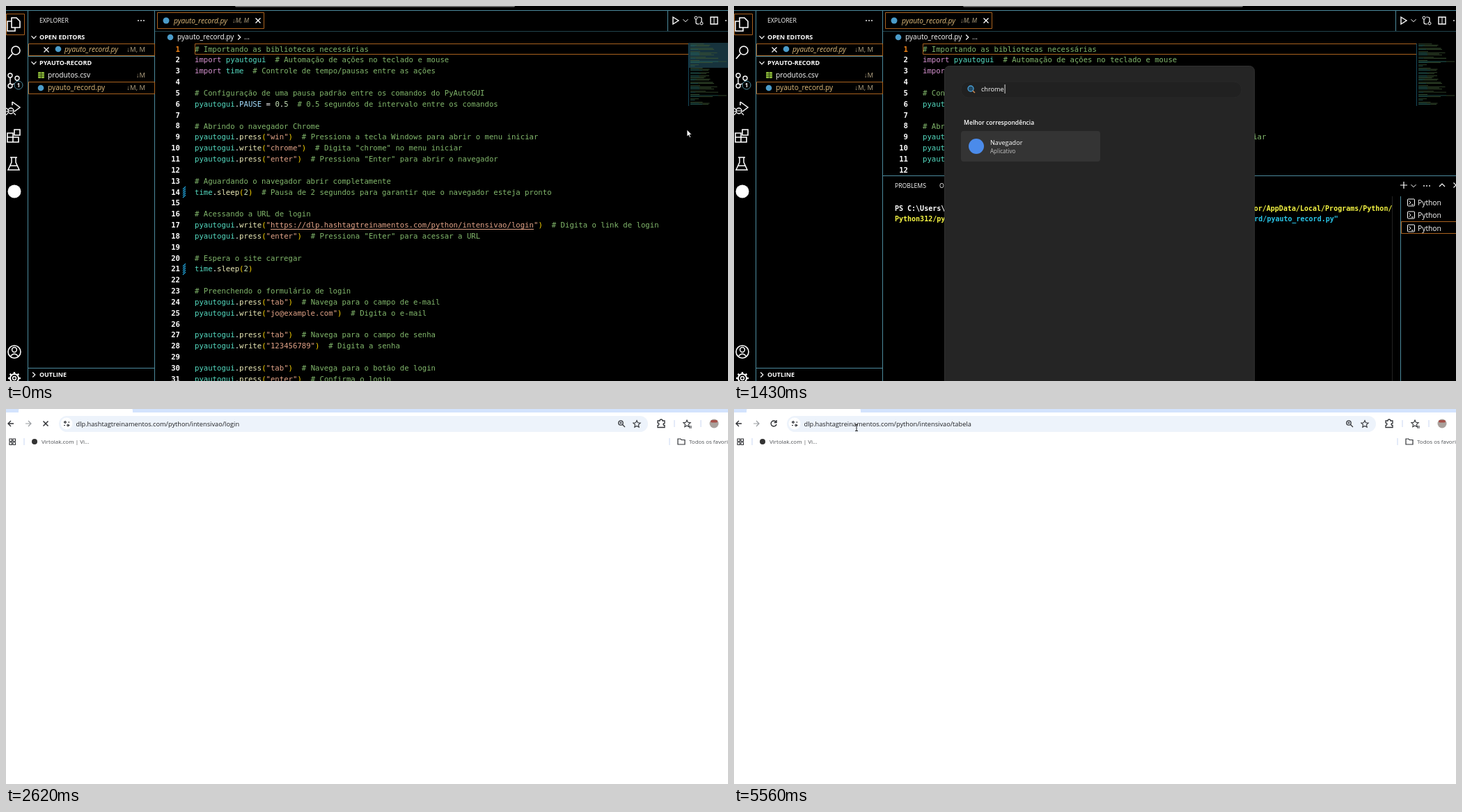
Write an HTML page with a canvas that moves like this. It is 1037 px wide and 540 px high and loops after 5.62 s.

```html
<!DOCTYPE html>
<html lang="pt">
<head>
<meta charset="utf-8">
<title>Automação de cadastro</title>
<style>
html, body { margin: 0; width: 100%; height: 100%; overflow: hidden; background: #000 }
canvas { display: block }
</style>
</head>
<body>
<canvas id="stage" width="1037" height="540"></canvas>
<script>
const LOOP = 5620, W = 1037, H = 540;
const c = document.getElementById('stage').getContext('2d');
const UI = '"Open Sans", sans-serif', MONO = '"DejaVu Sans Mono", monospace', FORM = 'Inter, sans-serif';
const TEAL = '#4c8a9d', ORANGE = '#a9621f', TAN = '#e2bd7c', DIM_TAN = '#b7a684';

// y is the visual middle of the line
function text(str, x, y, size, color, style = '', font = UI, align = 'left') {
  c.font = `${style} ${size}px ${font}`;
  c.textAlign = align;
  c.fillStyle = color;
  c.fillText(str, x, y + size * .34);
  return c.measureText(str).width;
}
function box(x, y, w, h, fill, radius = 0, stroke, line = 1) {
  c.beginPath();
  c.roundRect(x, y, w, h, radius);
  if (fill) { c.fillStyle = fill; c.fill(); }
  if (stroke) { c.strokeStyle = stroke; c.lineWidth = line; c.stroke(); }
}
const dot = (x, y, r, fill, stroke, line) => box(x - r, y - r, 2 * r, 2 * r, fill, r, stroke, line);
function path(x, y, d, color, line = 1.2, fill) {
  const p = new Path2D(d);
  c.save();
  c.translate(x, y);
  if (fill) { c.fillStyle = fill; c.fill(p); }
  c.strokeStyle = color; c.lineWidth = line; c.stroke(p);
  c.restore();
}
function card(x, y, w, h, radius, fill = '#fff') {
  c.save();
  c.shadowColor = '#0005'; c.shadowBlur = 5; c.shadowOffsetY = 1;
  box(x, y, w, h, fill, radius);
  c.restore();
}
const dots = (x, y, color) => [-4, 0, 4].forEach(d => dot(x + d, y, .9, color));
const CROSS = 'M-3.5-3.5l7 7M3.5-3.5l-7 7', DOWN = 'M-3.5-1.8L0 1.8l3.5-3.6', RIGHT = 'M-1.8-3.5L1.8 0l-3.6 3.5';

// ---------- code editor ----------
const ADDRESS = 'dlp.hashtagtreinamentos.com/python/intensivao/';
const MAIL = 'jo@example.com';
const code = `# Importando as bibliotecas necessárias
import pyautogui  # Automação de ações no teclado e mouse
import time  # Controle de tempo/pausas entre as ações

# Configuração de uma pausa padrão entre os comandos do PyAutoGUI
pyautogui.PAUSE = 0.5  # 0.5 segundos de intervalo entre os comandos

# Abrindo o navegador Chrome
pyautogui.press("win")  # Pressiona a tecla Windows para abrir o menu iniciar
pyautogui.write("chrome")  # Digita "chrome" no menu iniciar
pyautogui.press("enter")  # Pressiona "Enter" para abrir o navegador

# Aguardando o navegador abrir completamente
time.sleep(2)  # Pausa de 2 segundos para garantir que o navegador esteja pronto

# Acessando a URL de login
pyautogui.write("https://${ADDRESS}login")  # Digita o link de login
pyautogui.press("enter")  # Pressiona "Enter" para acessar a URL

# Espera o site carregar
time.sleep(2)

# Preenchendo o formulário de login
pyautogui.press("tab")  # Navega para o campo de e-mail
pyautogui.write("${MAIL}")  # Digita o e-mail

pyautogui.press("tab")  # Navega para o campo de senha
pyautogui.write("123456789")  # Digita a senha

pyautogui.press("tab")  # Navega para o botão de login
pyautogui.press("enter")  # Confirma o login`.split('\n');
const CHAR = 6.41, PITCH = 15.84;

function tokenColor(token, next) {
  if (token[0] == '#') return '#82b86c';
  if (token[0] == '"') return '#e3a488';
  if (token == 'import') return '#d592cf';
  if (token == 'pyautogui' || token == 'time') return '#55dcc2';
  if (token == 'PAUSE') return '#a5e0ff';
  if (/\d/.test(token)) return '#c5dfb6';
  if (/[()]/.test(token)) return '#ffd700';
  return next == '(' ? '#ecebb8' : '#fff';
}
function codeLines() {
  code.forEach((line, i) => {
    const y = 62 + i * PITCH;
    text(i + 1, 250, y, 10.6, i ? '#fff' : '#f38518', 'bold', MONO, 'right');
    for (const m of line.matchAll(/#.*|"[^"]*"|\w+|[^\w"#]/g))
      text(m[0], 271 + m.index * CHAR, y, 10.65, tokenColor(m[0], line[m.index + m[0].length]), '', MONO);
  });
  box(380, 321, 378, 1, '#e3a488');
  for (const y of [268, 379])
    for (let d = -7; d < 7; d += 3) path(254, y + d, 'M0 3l4-4', '#1f9bd0', 1.2);
}
function minimap(hover) {
  if (hover) box(980, 53, 57, 36, '#17333d');
  box(980, 54, 1, 90, '#164a5c');
  for (let i = 0; i < 57; i++) {
    const line = code[i % code.length], y = 54.3 + i * 1.58, start = line.search('#');
    if (start) box(983, y, Math.min(start < 0 ? line.length : start, 100) * .5, .8, '#27625b');
    if (start >= 0) box(983 + start * .5, y, Math.min(54 - start * .5, (line.length - start) * .5), .8, '#3b5433');
  }
}
function activityBar() {
  const w = '#fff';
  box(.5, 11.5, 26, 30, null, 0, ORANGE);
  path(11, 26, 'M-3-9h7l5 5v9h-12zM-3-4h-6v14h11v-5', w, 1.6);
  dot(14, 64, 6, null, w, 1.6); path(9, 69, 'M0 0l-6 7', w, 1.8);
  dot(6, 100, 3, null, w, 1.4); dot(6, 115, 3, null, w, 1.4); dot(16, 104, 3, null, w, 1.4);
  path(6, 103, 'M0 0v9M10 4q0 5-8 6', w, 1.4);
  dot(18, 114, 6, '#000', TEAL); text('1', 18, 114, 8, w, 'bold', UI, 'center');
  path(11, 147, 'M-2-9l11 8-8 6M-2-9v5', w, 1.5);
  dot(7, 151, 4, null, w, 1.4); path(7, 151, 'M-7-4l3 2M-7 1h3M-7 6l3-3M7 6l-3-3M-4 0h8', w, 1.1);
  path(11, 187, 'M-9-4h8v13h-8zM-9 2h16v7h-16M1-9h8v8h-8z', w, 1.6);
  path(11, 227, 'M-5-9h10M-3-9v7l-5 11h16l-5-11v-7M-5 3h10', w, 1.5);
  dot(12, 267, 9.5, w);
  dot(12, 498, 9, null, w, 1.6); dot(12, 495, 3.4, null, w, 1.5); path(12, 505, 'M-6 0q6-8 12 0', w, 1.5);
  dot(12, 536, 6, null, w, 2); dot(12, 536, 2.5, null, w, 1.4);
  for (let a = 0; a < 8; a++) {
    const u = Math.cos(a * .785), v = Math.sin(a * .785);
    path(12, 536, `M${u * 6} ${v * 6}L${u * 9} ${v * 9}`, w, 2.4);
  }
}
function sideBar() {
  text('EXPLORER', 48, 21.5, 8.7, '#fff');
  dots(194, 21, '#fff');
  path(40, 45, DOWN, '#fff'); text('OPEN EDITORS', 48, 45, 9, '#fff', 'bold');
  path(40, 82, DOWN, '#fff'); text('PYAUTO-RECORD', 48, 82, 9, '#fff', 'bold');
  path(40, 531, RIGHT, '#fff'); text('OUTLINE', 48, 531, 8.9, '#fff', 'bold');
  box(32.5, 54.5, 181, 17, null, 0, ORANGE);
  box(32.5, 109.5, 181, 17, null, 0, ORANGE);
  path(58, 63, CROSS, '#fff');
  dot(75, 62, 4.3, '#4b9cc9'); text('pyauto_record.py', 84, 63, 10.2, TAN, 'italic');
  box(46, 95, 9, 9, '#8bb83a', 1); path(46, 95, 'M0 3h9M0 6h9M4.5 0v9', '#24340c', .8);
  text('produtos.csv', 60, 99.5, 10.2, '#fff');
  dot(50, 118, 4.3, '#4b9cc9'); text('pyauto_record.py', 60, 118, 10.2, TAN);
  [[63, '↓M, M'], [100, '↓M'], [118, '↓M, M']].forEach(([y, s]) => text(s, 200, y, 9.5, DIM_TAN, '', UI, 'right'));
}
function terminal(t) {
  box(215, 244, W, H, '#000');
  box(214, 244, W, 1, TEAL);
  text('PROBLEMS', 231, 259, 8.7, '#fff');
  text('OUTPUT', 295, 259, 8.7, '#fff');
  text('DEBUG CONSOLE', 347, 259, 8.7, '#fff');
  text('TERMINAL', 438, 259, 8.7, '#fff');
  box(438, 268, 43, 1, '#f38518');
  path(962, 258, 'M-5 0h10M0-5v10', '#fff'); path(976, 259, DOWN, '#fff', 1);
  dots(995, 259, '#fff'); path(1017, 258, 'M-4 2l4-4 4 4', '#fff'); path(1037, 258, CROSS, '#fff');
  box(945, 274, 1, 266, '#222'); box(957, 274, 1, 266, TEAL);
  [283, 301, 320].forEach(y => {
    box(967.5, y - 5, 10, 10, null, 1, '#fff');
    path(971, y, 'M-1.5-2.5l2.5 2.5-2.5 2.5M2 3h3', '#fff', 1);
    text('Python', 982, y, 10.3, '#fff');
  });
  box(958.5, 310.5, 80, 17, null, 0, ORANGE);
  if (t < 540) return;
  const folder = 'Documents/Programas/Estudos/Automacao/pyauto-record';
  const put = (s, x, y, color) => text(s, x, y, 10, color, 'bold', MONO);
  put(`PS C:\\Users\\autor\\${folder.replaceAll('/', '\\')}> &`, 231, 292, '#fff');
  put('C:/Users/autor/AppData/Local/Programs/Python/', 674.5, 292, '#f5f543');
  put('Python312/python.exe', 231, 306.5, '#f5f543');
  put(`"c:/Users/autor/${folder}/pyauto_record.py"`, 356, 306.5, '#29c5e8');
}
function editor(t) {
  box(0, 0, W, H, '#000');
  box(329, -2, 402, 3.5, '#777', 2);
  codeLines();
  box(271.5, 54.5, 709, 15, null, 0, ORANGE);
  minimap(t < 150);
  box(0, 6, W, 1, TEAL);
  [31, 213].forEach(x => box(x, 6, 1, H, TEAL));
  [72, 521].forEach(y => box(32, y, 181, 1, TEAL));
  box(214, 36, W, 1, '#21434d');
  box(950, 6, 1, 30, TEAL);
  activityBar();
  sideBar();
  box(217.5, 9.5, 153, 23, null, 0, ORANGE);
  dot(230, 21, 4.5, '#4b9cc9'); text('pyauto_record.py', 241, 21.5, 10.2, TAN, 'italic');
  text('↓M, M', 325, 21, 9, DIM_TAN, 'italic'); path(362, 21, CROSS, '#fff', 1.4);
  dot(236, 45, 4.3, '#4b9cc9'); text('pyauto_record.py', 246, 45, 10.1, '#fff');
  path(335, 45, RIGHT, '#fff'); text('...', 342, 45, 10, '#fff');
  path(962, 21, 'M-4-5l8 5-8 5z', '#fff', 1.4); path(976, 21, DOWN, '#fff', 1);
  dot(991, 17, 2, null, '#fff'); dot(999, 25, 2, null, '#fff');
  path(995, 21, 'M-4-2v5q0 2 3 2h2M4 2v-5q0-2-3-2h-2', '#fff');
  box(1012, 16, 10, 10, null, 0, '#fff', 1.4); box(1016.5, 16, 1, 10, '#fff'); dots(1038, 21, '#fff');
  if (t >= 420) terminal(t);
}
function pointer(t) {
  const p = Math.min(1, Math.max(0, (t - 60) / 300)), e = p * p * (3 - 2 * p);
  path(978 - 17 * e, 178 - 158 * e, 'M0 0v10l2.4-2 1.6 3.6 1.6-.8L4 7.3h3z', '#000', .8, '#fff');
}

// ---------- start menu ----------
const apps = [
  ['NR Leitura', '', '#5b3c88'], ['Ruma', '', '#1f9fd8', 1], ['Vantorix 365', '(Pacote)', '#6a64d8', 1],
  ['Postvale (new)', '', '#1a78d0'], ['Vantorix Loja', '', '#e6e6e6'], ['Fotos', '', '#2b86dc'],
  ['Configurações', '', '#8a9299', 1], ['Zolk', '', '#107c10'], ['Textorial', '', '#0f7b68', 1],
  ['Vantorix', 'Cortavídeo', '#8d4be0'], ['Fazer', '', '#3d82e6'], ['Tramarix', '', '#0a66c2'],
  ['Calculadora', '', '#8fa9ba'], ['Relógio', '', '#d9d9d9', 1], ['Bloco de notas', '', '#48b4dc'],
  ['Traço', '', '#2d9bd4', 1], ['Filmes e TV', '', '#1c8ad6'], ['Ferramenta de', 'Captura', '#d9d4d4']];
const recents = [
  ['TelaQuadros', 'Adicionados recentemente', '#c9c9c9'], ['Prisma DX Desktop', 'Adicionados recentemente', '#e8b71d'],
  ['Résumé - Caio Benedito Fontana L...', '4h atrás', 'pdf'], ['Animação', '7h atrás', 'image'],
  ['Dashboard Demonstration', '7h atrás', 'page'], ['Apostila - Conceitos Básicos da Ori...', '23h atrás', 'pdf']];

function menuButton(label, x, y, w) {
  box(x, y - 8, w, 17, '#343434', 3);
  text(label, x + 6, y, 8.1, '#fff');
  path(x + w - 9, y, 'M-1.5-2.5l2.5 2.5-2.5 2.5', '#ccc', 1);
}
function startMenu(t) {
  const e = Math.min(1, Math.max(0, (t - 950) / 170));
  c.save();
  c.translate(0, 456 * (1 - e) ** 3);
  box(302.5, 86.5, 445, 480, '#252525', 7, '#303030');
  box(326, 109, 403, 23, '#212121', 11, '#292929');
  dot(340, 119, 4, '#234a63', '#4aa0d8', 1.3); path(343, 122, 'M0 0l3 3', '#d08a50', 1.5);
  if (t < 1240) {
    box(355, 113, 1, 13, '#ddd');
    text('Pesquisar aplicativos, configurações e documentos', 355, 120, 9.15, '#a8a8a8');
    text('Fixado', 346, 168, 9.1, '#fff', '600');
    menuButton('Todos', 655, 168, 48);
    apps.forEach(([name, more, color, round], i) => {
      const x = 358 + i % 6 * 66.6, y = 204 + (i / 6 | 0) * 58.2;
      box(x - 11, y - 11, 22, 22, color, round ? 11 : 2);
      if (name == 'Relógio') path(x, y, 'M-4-5L0 0l4-3', '#333', 1.5);
      text(name, x, y + 20, 8.1, '#fff', '', UI, 'center');
      text(more, x, y + 31, 8.1, '#fff', '', UI, 'center');
    });
    dot(736, 268, 2, '#aaa'); dot(736, 276, 1.3, '#888');
    text('Recomendações', 346, 391, 9.1, '#fff', '600');
    menuButton('Mais', 660, 391, 43);
    recents.forEach(([name, info, kind], i) => {
      const x = 358 + i % 2 * 200, y = 427 + (i / 2 | 0) * 39;
      if (kind[0] == '#') box(x - 10, y - 9, 20, 18, kind, 1);
      else {
        path(x, y, 'M-8-10h11l5 5v16h-16z', '#ccc', .5, '#f4f4f4');
        if (kind == 'pdf') { box(x - 9, y - 3, 18, 9, '#d8232a'); text('PDF', x, y + 1.5, 7, '#fff', 'bold', UI, 'center'); }
        if (kind == 'image') box(x - 5, y - 3, 10, 9, '#2b86dc');
      }
      text(name, x + 19, y - 5, 8.1, '#fff');
      text(info, x + 19, y + 6, 8.1, '#d0d0d0');
    });
  } else {
    const w = text('chrome', 355, 120, 9.15, '#fff');
    box(356 + w, 113, 1, 13, '#ddd');
    text('Melhor correspondência', 330, 168, 8.6, '#fff', '600');
    box(326, 180, 200, 44, '#343434', 4);
    dot(348, 202, 11, '#4b8bea');
    text('Navegador', 368, 197, 9.1, '#fff'); text('Aplicativo', 368, 209, 8.1, '#c4c4c4');
  }
  c.restore();
}

// ---------- browser ----------
const INK = '#303236';
function toolbar(url, { loading, key, focused }) {
  box(0, 0, W, H, '#fff');
  box(0, 0, W, 5, '#d3e3fd');
  box(18, 0, 164, 5, '#fff');
  dot(14, 0, 4.5, '#d3e3fd'); dot(186, 0, 4.5, '#d3e3fd');
  const arrow = 'M4 0h-8M0-4l-4 4 4 4';
  path(7, 21, arrow, INK, 1.4);
  c.save(); c.translate(32, 21); c.scale(-1, 1); path(0, 0, arrow, '#9a9da1', 1.2); c.restore();
  if (loading) path(57, 21, CROSS, INK, 1.5);
  else path(57, 21, 'M3.6-2A4 4 0 1 0 4 1M4-5v3.5h-3.5', INK, 1.4);
  if (focused) box(76, 10, 846, 23, '#fff', 11.5, '#0b57d0', 1.5);
  else box(76, 10, 846, 23, '#edf3fb', 11.5);
  dot(87, 21, 8.5, '#fff');
  path(87, 21, 'M-4-2h3M2-2h2.5M-4 2.5h2M1.5 2.5h3', INK, 1.2);
  dot(85, 19, 1.4, null, INK); dot(89, 23.5, 1.4, null, INK);
  text(url, 100.5, 21.5, 9.22, '#1f2023');
  if (key) { dot(859, 21.5, 2.7, null, INK, 1.4); path(862, 21.5, 'M0 0h6v2.5h-2v-2', INK, 1.6); }
  dot(883, 20, 3.2, null, INK, 1.3); path(883, 20, 'M2.5 2.5l3.5 3.5M-1.5 0h3M0-1.5v3', INK, 1.2);
  const star = 'M0-5l1.5 3.3 3.6.4-2.7 2.4.8 3.6L0 2.9l-3.2 1.8.8-3.6-2.7-2.4 3.6-.4z';
  path(906, 21.5, star, INK, 1.1);
  path(941, 21, 'M-5-4h3q0-2 2-2t2 2h3v3.5q-2 0-2 1.5t2 1.5v3h-10v-3q2-.3 2-1.8t-2-1.7z', INK, 1.3);
  path(978, 21, star, INK, 1.1); path(980, 25, 'M0 0h5M1 2h4', INK, 1);
  [[960, 16], [998, 16], [26, 42], [953, 42]].forEach(([x, y]) => box(x - .5, y, 1, 10, '#c9d8f3'));
  dot(1017, 21, 6.5, '#a9a19c'); box(1012, 16, 10, 3.5, '#a65048', 2);
  [[5, 43], [10, 43], [5, 48], [10, 48]].forEach(([x, y]) => box(x, y, 3.5, 3.5, null, 0, INK, 1.1));
  dot(41, 47, 4, '#333');
  text('Virtolak.com | Vi...', 51, 47, 8, '#4c4f53');
  path(970, 47, 'M-5-4h4l1 1.5h5v6.5h-10z', INK, 1.2);
  text('Todos os favori', 981, 47, 7.95, '#4c4f53');
}
function newTab(t) {
  toolbar('', { focused: true });
  box(300, 215, 437, 34, '#f1f3f4', 17);
  [478, 559].forEach(x => { dot(x, 320, 18, '#edf2fa'); box(x - 20, 350, 40, 5, '#e4e7eb', 2); });
  if (t < 1850) return;
  const full = 'https://' + ADDRESS + 'login';
  const typed = full.slice(0, Math.ceil((t - 1840) / 470 * full.length));
  card(70, 7, 858, 264, 14);
  dot(87, 21, 4, null, '#0b57d0', 1.4);
  const w = text(typed, 100.5, 21.5, 9.22, '#1f2023');
  box(101 + w, 15, 1, 13, '#1f2023');
  box(70, 38, 858, 26, '#edf1f7', [0, 13, 13, 0]);
  [typed, ADDRESS + 'login', ADDRESS + 'tabela', ADDRESS].forEach((s, i) => {
    dot(87, 51 + i * 30, 4, null, '#5f6368');
    text(s, 100.5, 51 + i * 30, 9.22, i ? '#0b57d0' : '#1f2023');
  });
}

// ---------- pages ----------
function field(x, y, w, value, hint, active) {
  box(x, y, w, 27, '#fff', 13.5, active ? '#111' : '#8c8c8c', active ? 2 : 1);
  const len = text(value || hint, x + 10, y + 13.5, 14.65, value ? '#2a2a2a' : '#6b6b6b', '', FORM);
  if (active) box(x + 11 + (value ? len : 0), y + 5, 1, 17, '#222');
}
function button(y, label, active) {
  box(290, y, 458, 30, '#2c2c2c', 15, active ? '#0b57d0' : '#2c2c2c', 2);
  text(label, 519, y + 15, 14.65, '#fff', '600', FORM, 'center');
}
function loginPage(t) {
  text('Login', 519, 160, 29.4, '#2b2b2b', 'bold', FORM, 'center');
  const mail = t >= 2840 ? MAIL : '', pass = t >= 2960 ? '•'.repeat(9) : '';
  text('E-mail', 299, 215, 17.2, '#222', '600', FORM);
  field(290, 235, 458, mail, 'E-mail', t < 2900);
  text('Senha', 299, 289, 17.2, '#222', '600', FORM);
  field(290, 309, 458, pass, 'Senha', t >= 2900 && t < 3040);
  button(365, 'Entrar', t >= 3040);
}
const labels = ['Código', 'Marca', 'Tipo', 'Categoria', 'Preço Unitário', 'Custo'].map(s => s + ' do Produto').concat('OBS');
const BRAND = 'Nalverix';
const products = [
  ['MOLO000251', BRAND, 'Mouse', '1', '25.95', '6.50', ''],
  ['MOLO000192', BRAND, 'Mouse', '1', '19.99', '5.40', '']];

// even steps move the focus, odd steps fill the focused field
function productForm(values, step) {
  const focus = step >> 1, filled = step + 1 >> 1;
  c.save();
  c.beginPath(); c.rect(0, 58, W, H); c.clip();
  if (focus > 4) c.translate(0, -210);
  text('Formulário de Cadastro de Produtos', 519.5, 111.5, 29.4, '#2b2b2b', 'bold', FORM, 'center');
  labels.forEach((label, i) => {
    const y = 159.5 + i * 74.45;
    text(label, 299, y, 17.2, '#222', '600', FORM);
    field(290, y + 20, 458, i < filled ? values[i] : '', label, i == focus);
  });
  button(700, 'Enviar', false);
  if (step == 3 || step == 5) {
    const y = 286 + (focus - 1) * 74.45;
    card(359, y, 109, 33, 4);
    text(values[focus], 367, y + 16.5, 8.2, '#222', '600');
  }
  c.restore();
}
function browser(t) {
  if (t < 2450) return t < 1790 ? toolbar('', { focused: true }) : newTab(t);
  const table = t >= 3120;
  toolbar(ADDRESS + (table ? 'tabela' : 'login'), {
    loading: t < 2760 || t >= 3080 && t < 3200,
    key: t >= 2960 && t < 4260
  });
  const step = (from, ms, first, last) => Math.min(last, first + Math.floor((t - from) / ms));
  if (t >= 2760 && t < 3120) loginPage(t);
  else if (t >= 3260 && t < 3940) productForm(products[0], step(3260, 68, 0, 7));
  else if (t >= 3940 && t < 4260) productForm(products[0], step(3940, 60, 8, 12));
  else if (t >= 4560 && t < 5190) productForm(products[1], step(4560, 60, 0, 9));
  else if (t >= 5190 && t < 5440) productForm(products[1], step(5190, 60, 10, 12));
  if (t >= 5500) path(176, 27, 'M-2-4.5h4M0-4.5v9M-2 4.5h4', '#222', 1);
}

function draw() {
  const t = performance.now() % LOOP;
  if (t < 1560) {
    editor(t);
    if (t < 900) pointer(t);
    if (t >= 950 && t < 1490) startMenu(t);
  } else if (t < 1620) box(0, 0, W, H, '#fff');
  else browser(t);
  requestAnimationFrame(draw);
}
draw();
</script>
</body>
</html>
```
